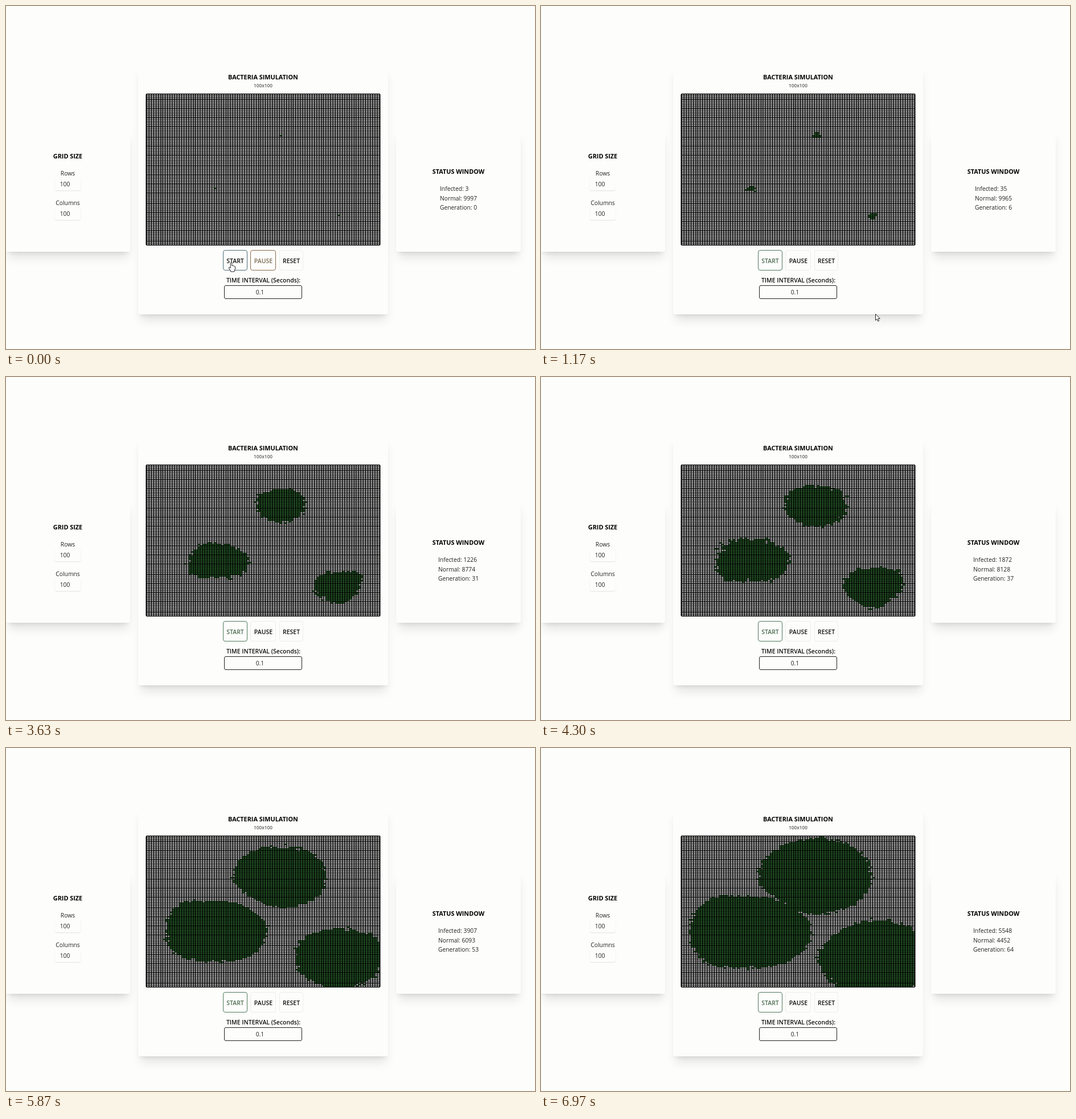
These frames come from a looping animation (929 px wide and 603 px high, 7010 ms). An HTML page with a canvas:

```html
<!DOCTYPE html>
<html lang="en">
<head>
<meta charset="utf-8">
<title>Bacteria Simulation</title>
<style>
  html, body { margin: 0; width: 100%; height: 100%; overflow: hidden; background: #fdfdfc; }
  #stage { position: absolute; left: 0; top: 0; width: 929px; height: 603px; overflow: hidden; }
  #stage > * { position: absolute; box-sizing: border-box; }
  .card {
    background: #fdfdfc; border-radius: 3px;
    box-shadow: 0 14px 17px -3.5px rgba(0,0,0,.1), 0 5.5px 7px -4px rgba(0,0,0,.1);
  }
  .field { left: 86px; width: 45px; height: 22px; border-radius: 3px;
    box-shadow: 0 1px 2px rgba(0,0,0,.11); }
  .btn { top: 429px; height: 36px; border: 1px solid #ececec; border-radius: 4px; }
  #time { left: 383px; top: 491px; width: 137px; height: 24px;
    border: 1px solid #222; border-radius: 3px; }
  svg, canvas { left: 0; top: 0; }
  text { font: 10.3px "Open Sans", "Noto Sans", sans-serif; fill: #222; text-anchor: middle; }
  .head { font-weight: 700; font-size: 10.85px; fill: #000; }
  .label { font-weight: 600; font-size: 10.5px; fill: #111; }
  .small { font-weight: 600; font-size: 8.3px; fill: #5c5c5c; }
  .stat { text-anchor: start; }
</style>
</head>
<body>
<div id="stage">
  <div class="card" style="left:0;top:216px;width:218px;height:216px"></div>
  <div class="card" style="left:232px;top:104px;width:439px;height:438px"></div>
  <div class="card" style="left:685px;top:216px;width:219px;height:216px"></div>
  <div class="field" style="top:302px"></div>
  <div class="field" style="top:354px"></div>
  <div class="btn" id="startBox" style="left:381px;width:43px"></div>
  <div class="btn" id="pauseBox" style="left:429px;width:45px"></div>
  <div class="btn" style="left:480px;width:42px"></div>
  <div id="time"></div>
  <canvas id="grid" width="929" height="603"></canvas>
  <svg width="929" height="603">
    <text class="head" x="451.5" y="128.5">BACTERIA SIMULATION</text>
    <text class="small" x="451.5" y="142.5">100x100</text>
    <text class="head" x="108.5" y="267.5">GRID SIZE</text>
    <text x="108.5" y="297.5">Rows</text>
    <text x="103.5" y="317">100</text>
    <text x="108.5" y="349.5">Columns</text>
    <text x="103.5" y="369">100</text>
    <text class="head" x="794.5" y="295">STATUS WINDOW</text>
    <text class="stat" y="325"></text>
    <text class="stat" y="341.5"></text>
    <text class="stat" y="358"></text>
    <text class="label" id="startText" x="402.5" y="451.5">START</text>
    <text class="label" id="pauseText" x="452" y="451.5">PAUSE</text>
    <text class="label" x="501" y="451.5">RESET</text>
    <text class="label" x="452" y="485.5">TIME INTERVAL (Seconds):</text>
    <text x="446" y="507">0.1</text>
    <g id="cursor" fill="#fff" stroke="#111" stroke-width=".9" stroke-linejoin="round">
      <path id="arrow" d="M.5 .5V11.6L3 9.3L4.8 13.3L6.6 12.5L4.9 8.6H8.3Z"/>
      <path id="hand" d="M-1.3 1.2Q0 -.6 1.3 1.2V6Q2.6 5.2 3.4 6.4Q4.8 5.8 5.3 7Q6.9 6.7 7 8.3V11.5L5.6 14.5V16.5H-1V14.8L-4.2 10.4Q-4.4 8.4 -2.6 9L-1.3 10.3Z"/>
    </g>
  </svg>
</div>
<script>
const LOOP = 7010, CLICK = 435, FIRST = 535, TICK = 99.8;
const N = 100, X = 246, Y = 154, W = 411, H = 267;
const SCALE = 0.69; // the page is shown zoomed out; cell edges snap before scaling
const $ = id => document.getElementById(id);
const ctx = $("grid").getContext("2d");
const stats = document.querySelectorAll(".stat");

// Colony reach in cells, clockwise from the right, at each generation in STAGES.
const STAGES = [31, 44, 64];
const COLONIES = [
  { x: 57, y: 27, reach: [
    [11, 10.7, 11, 10.3, 11, 12, 12, 12.5],
    [17, 18.3, 17, 16.7, 17.5, 19.4, 17.5, 18.3],
    [25, 25.3, 25.5, 22, 26, 26, 28, 27]] },
  { x: 29, y: 62, reach: [
    [15, 15, 12, 15, 11.5, 11.5, 11.3, 12],
    [20.5, 20.8, 18, 21, 18.5, 21, 17.7, 19],
    [27, 27.5, 26, 29.7, 26.8, 28, 23.5, 24.4]] },
  { x: 82, y: 80, reach: [
    [9.5, 9, 12, 10.5, 11, 11, 10, 13],
    [16.5, 16.8, 18, 17, 16.3, 18, 15.5, 18],
    [27, 27, 27, 25, 24.8, 23.2, 26, 26]] }
];
// Generation and infected total.
const COUNTS = [[0, 3], [6, 35], [19, 450], [31, 1226], [44, 2797], [53, 3907], [64, 5548], [70, 6400]];

let seed = 71;
const random = () => (seed = (seed * 16807) % 2147483647) / 2147483647;
const clamp = v => Math.max(0, Math.min(1, v));
const ease = v => { v = clamp(v); return v * v * (3 - 2 * v); };

function reachAt(list, angle) {
  const a = (angle / (Math.PI / 4) + 8) % 8, i = Math.floor(a);
  const k = (1 - Math.cos((a - i) * Math.PI)) / 2;
  return list[i % 8] * (1 - k) + list[(i + 1) % 8] * k;
}

function arrival(c, col, row) {
  const dx = col - c.x, dy = row - c.y, d = Math.hypot(dx, dy);
  if (!d) return -99;
  const angle = Math.atan2(dy, dx);
  const r = c.reach.map(list => reachAt(list, angle));
  if (d <= r[0]) return STAGES[0] * d / r[0];
  const i = d <= r[1] ? 0 : 1;
  return STAGES[i] + (STAGES[i + 1] - STAGES[i]) * (d - r[i]) / (r[i + 1] - r[i]);
}

const cells = [];
for (let row = 0; row < N; row++) {
  for (let col = 0; col < N; col++) {
    const first = Math.min(...COLONIES.map(c => arrival(c, col, row)));
    const rough = Math.sin(col * 0.8 + row * 0.4) * Math.sin(row * 1.3 - col * 0.3);
    cells.push({ col, row, at: first + 2 * rough + (random() - 0.5) * 4 });
  }
}
cells.sort((a, b) => a.at - b.at);

function infected(gen) {
  let i = 0;
  while (i < COUNTS.length - 2 && gen >= COUNTS[i + 1][0]) i++;
  const [g0, n0] = COUNTS[i], [g1, n1] = COUNTS[i + 1];
  const k = (gen - g0) / (g1 - g0);
  return Math.round((Math.sqrt(n0) * (1 - k) + Math.sqrt(n1) * k) ** 2);
}

// Start and length of the inside of cell i along a side.
function span(i, size) {
  const edge = k => Math.round(k * (size - 2) / N / SCALE);
  return [1 + (edge(i) + 1) * SCALE, (edge(i + 1) - edge(i) - 1.9) * SCALE];
}

function drawCell(c) {
  const [x, w] = span(c.col, W), [y, h] = span(c.row, H);
  ctx.fillRect(X + x, Y + y, w, h);
}

function drawGrid(total) {
  ctx.clearRect(0, 0, 929, 603);
  ctx.fillStyle = "#000";
  ctx.beginPath();
  ctx.roundRect(X - 0.5, Y, W + 1, H, 2);
  ctx.fill();
  ctx.fillStyle = "#fff";
  cells.slice(total).forEach(drawCell);
  ctx.fillStyle = "#37803a";
  cells.slice(0, total).forEach(drawCell);
}

function mix(a, b, k) {
  return `rgb(${a.map((v, i) => Math.round(v + (b[i] - v) * k))})`;
}

function drawButtons(t) {
  const k = ease((t - CLICK) / 150);
  $("startBox").style.borderColor = mix([78, 108, 116], [79, 122, 92], k);
  $("startText").style.fill = mix([17, 17, 17], [75, 107, 79], k);
  $("pauseBox").style.borderColor = mix([138, 106, 74], [236, 236, 236], k);
  $("pauseText").style.fill = mix([122, 106, 80], [17, 17, 17], k);
}

function drawCursor(t) {
  const k = ease((t - 600) / 480);
  const x = 395.5 + 191.5 * k + 3 * ease((t - 1700) / 200);
  const y = 450.5 + 90.5 * k;
  const over = y < 458;
  $("cursor").setAttribute("transform", `translate(${x} ${y})`);
  $("cursor").style.display = t < 3000 ? "" : "none";
  $("hand").style.display = over ? "" : "none";
  $("arrow").style.display = over ? "none" : "";
}

let shown = -1;
function frame(now) {
  const t = now % LOOP;
  const gen = Math.max(0, Math.floor((t - FIRST) / TICK));
  if (gen !== shown) {
    shown = gen;
    const total = infected(gen);
    drawGrid(total);
    const lines = [`Infected: ${total}`, `Normal: ${N * N - total}`, `Generation: ${gen}`];
    stats.forEach((el, i) => {
      el.textContent = lines[i];
      el.setAttribute("x", gen < 10 ? 762 : 759);
    });
  }
  drawButtons(t);
  drawCursor(t);
}

const begin = performance.now();
function loop() {
  frame(performance.now() - begin);
  requestAnimationFrame(loop);
}
loop();
</script>
</body>
</html>
```
